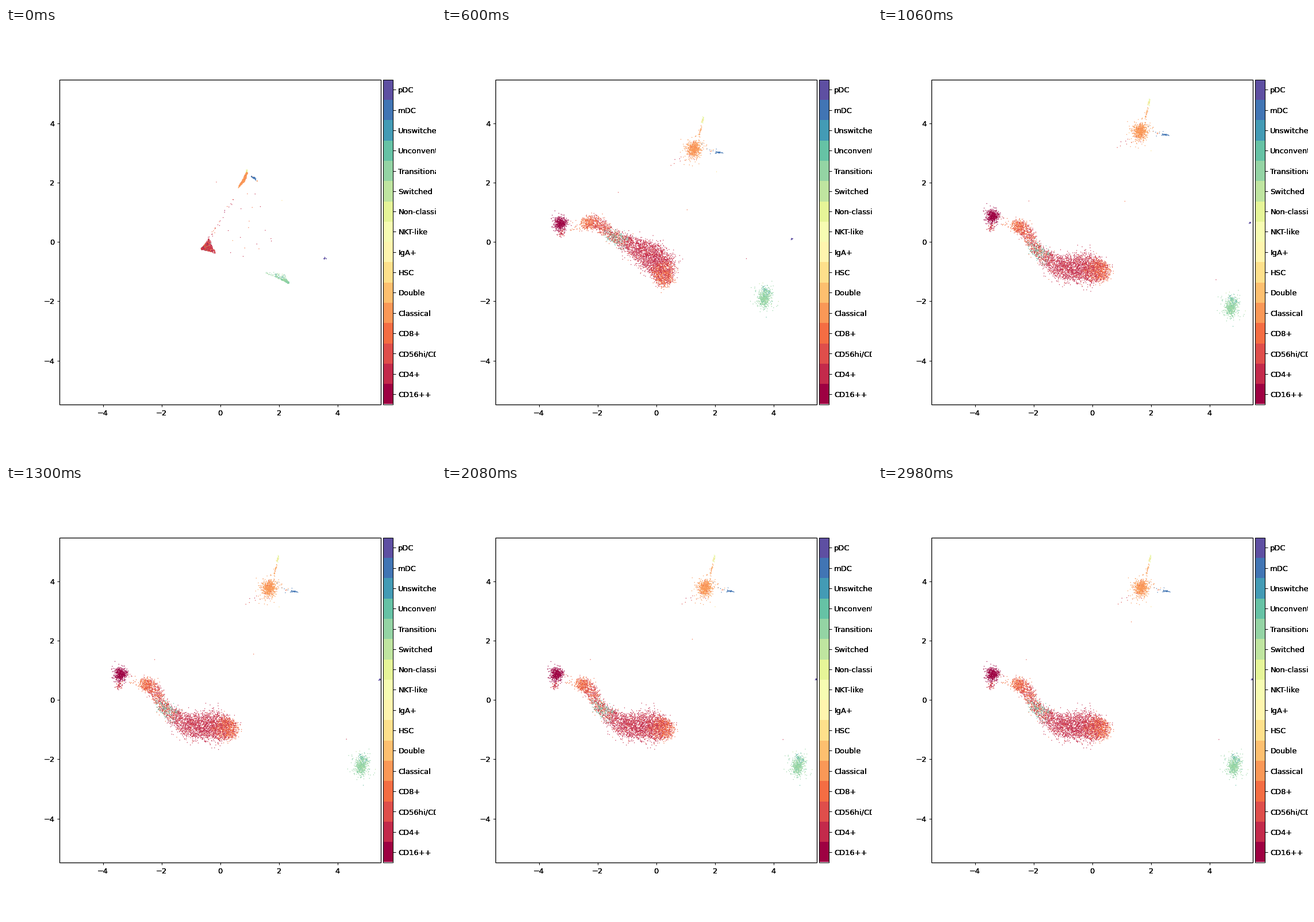
These frames come from a looping animation (748 px wide and 748 px high, 3030 ms). A matplotlib script:

```python
import numpy as np
import matplotlib.pyplot as plt
from matplotlib.animation import FuncAnimation
from matplotlib.patches import Rectangle

SIZE, DPI = 748, 93.5
LOOP, INTERVAL, STEP, STEPS = 3030, 15, 20, 150
LEFT, RIGHT = .125 * SIZE, 651.8
TOP, BOTTOM = .12 * SIZE, .875 * SIZE
BAR_X, BAR_W = 656.5, 16.75
TICK = 3.5 * DPI / 72
NAMES = ["CD16++", "CD4+", "CD56hi/CD16", "CD8+", "Classical", "Double",
         "HSC", "IgA+", "NKT-like", "Non-classical", "Switched",
         "Transitional", "Unconventional", "Unswitched", "mDC", "pDC"]
COLORS = plt.get_cmap("Spectral")(np.linspace(0, 1, len(NAMES)))

rng = np.random.default_rng(7)
groups = []  # (start, early home, late home, categories, mix function)


def wedge(n, corner, e1, e2, power):
    """Triangle of points crowded towards one corner."""
    r, f = rng.random((n, 1)) ** power, rng.random((n, 1))
    edge = f * np.array(e1) + (1 - f) * np.array(e2)
    return corner + r * edge + rng.normal(0, .5, (n, 2))


def drift(t):
    return 1 / (1 + np.exp((570 - t) / 145))


def island(n, cats, c0, c1, start, sx=0, sy=0, deg=0, off=(0, 0), mix=drift):
    """Rigid cloud that travels from c0 to c1."""
    z = rng.normal(size=(n, 2)) * np.where(rng.random((n, 1)) < .1, 1.8, 1)
    a = np.radians(deg)
    turn = np.array([[np.cos(a), np.sin(a)], [-np.sin(a), np.cos(a)]])
    shape = (z * [sx, sy]) @ turn + off
    groups.append((start, c0 + shape, c1 + shape, rng.choice(cats, n), mix))


# Lymphocytes: a cloud along a curve that bends from one pose to another.
# Knots: NK tail, NK, then the T cell body from left to right.
early = np.array([(247, 392), (230, 385), (259, 335), (279, 328),
                  (312, 351), (352, 374), (384, 405), (386, 441)])
late = np.array([(196, 347), (199, 327), (239, 344), (253, 348),
                 (275, 386), (316, 418), (362, 418), (393, 424)])
width = np.array([3, 5.5, 4.5, 6, 5, 10, 14, 7])
knots = np.arange(len(width))

body = np.interp(rng.random(4300), [0, .09, .21, .37, .68, 1], knots[2:])
u = np.concatenate([np.zeros(50), np.ones(480), rng.uniform(1, 2, 45), body])
n = len(u)
angle = rng.random(n) * 2 * np.pi
radius = np.where(u < 2, rng.rayleigh(1, n), 1.9 * np.sqrt(rng.random(n)))
radius *= np.where(rng.random(n) < .12, 1.5, 1)
cloud = np.column_stack([np.cos(angle), np.sin(angle)]) * radius[:, None]
cloud += rng.normal(0, .25, (n, 2))
cloud *= np.interp(u, knots, width)[:, None]


def along(points):
    return np.column_stack([np.interp(u, knots, points[:, i]) for i in (0, 1)]) + cloud


BANDS = [.5, 1.3, 2.8, 3.3, 3.7, 4.4, 6.4]
MIXES = [[0, 2, 2, 1], [0], [3, 3, 3, 4, 2], [3, 1, 2], [3, 3, 2, 1],
         [12, 12, 3, 2, 1], [1] * 14 + [2, 3], [3, 3, 3, 3, 1]]
kinds = np.array([rng.choice(MIXES[b]) for b in np.searchsorted(BANDS, u)])
lag = (.2 + 1.4 * np.clip((u - 1) / 6, 0, 1))[:, None]


def bend(t):
    p = np.clip((t - 340) / 720, 0, 1)
    return (p * p * (3 - 2 * p)) ** lag  # the left end leads


lymph = wedge(n, (341, 384), (12, -18), (24, 8), 8)
path = rng.choice(n, 42, replace=False)
lymph[path[:26]] = ((353, 367) + rng.random((26, 1)) ** 1.3 * [54, -90]
                    + rng.normal(0, 1.8, (26, 2)))
lymph[path[26:]] = rng.dirichlet([1, 1, 1], 16) @ [(350, 380), (430, 270), (485, 425)]
groups.append((lymph, along(early), along(late), kinds, bend))


# Myeloid cells share one path
def myeloid(n, cats, *shape, off=(0, 0), start=None):
    if start is None:
        start = wedge(n, (419, 252), (-16, 27), (-3, 14), 2)
    island(n, cats, (414, 252), (458, 177), start, *shape, off=off)


myeloid(640, [4] * 20 + [3, 5], 5.8, 7.2, 15)
myeloid(40, [4, 4, 5, 2], 11, 9, 20)
myeloid(28, [4, 4, 5], .6, 5.5, 14, off=(11, -32))
myeloid(32, [9, 9, 9, 6], .6, 3.8, 14, off=(14.5, -48),
        start=wedge(32, (419, 247), (1, 8), (-3, 6), 1))
myeloid(8, [2, 1, 3], 8, 2.5, -35, off=(-33, 24))
myeloid(36, [14], 3, .6, 7, off=(43, 6),
        start=wedge(36, (427, 258), (8, 7), (6, 2), 1))
myeloid(12, [14, 4, 14], 5, 2, 20, off=(29, 2),
        start=wedge(12, (427, 258), (14, 13), (8, 6), 1))


# B cells
def b_cells(n, cats, *shape, off=(0, 0)):
    island(n, cats, (489, 449), (619, 488), wedge(n, (491, 443), (-50, -21), (-4, -14), 5),
           *shape, off=off)


b_cells(430, [11] * 14 + [10, 12], 5, 6.5, 10)
b_cells(75, [11, 11, 13, 12], 4, 4, 0, off=(4, -14))
b_cells(50, [11, 11, 12, 10], 8, 9, 0, off=(1, -5))

island(16, [15], (557, 404), (651, 336), wedge(16, (553, 402), (5, 1), (2, -4), 1), .6, .5)

# Lone points
for cat, c0, c1, mix in [(3, (423, 336), (441, 235), lambda t: t / 3000),
                         (2, (366, 268), (258, 302), drift),
                         (1, (451, 352), (593, 441), drift),
                         (6, (480, 300), (475, 210), drift)]:
    island(1, [cat], c0, c1, np.array([c0]), mix=mix)

cats = np.concatenate([g[3] for g in groups])
N = len(cats)
order = rng.permutation(N)
fling = rng.normal(0, 45, (N, 2)) * rng.random((N, 1)) ** 3
fling[cats > 3] *= .3


def positions(step):
    t = step * STEP
    bunch = (1 - min(t / 340, 1)) ** 2.4
    pos = []
    for start, a, b, _, mix in groups:
        first = a + (b - a) * mix(0)
        pos.append(a + (b - a) * mix(t) + (start - first) * bunch)
    pos = np.concatenate(pos)
    if step:
        noise = np.random.default_rng(step).normal(size=(N, 2))
        pos += fling * (t / 80) * np.exp(1 - t / 80) + noise * .4 * (1 - step / STEPS)
    return pos[order]


fig = plt.figure(figsize=(SIZE / DPI, SIZE / DPI), dpi=DPI, facecolor="white")
ax = fig.add_axes([0, 0, 1, 1])
ax.set(xlim=(0, SIZE), ylim=(SIZE, 0))
ax.axis("off")


def tick(xs, ys):
    ax.plot(xs, ys, color="black", lw=.8, solid_capstyle="butt", zorder=4)


def label(x, y, s, ha, va="center_baseline"):
    # Overprinted for heavier edges
    for _ in range(3):
        ax.text(x, y, s, ha=ha, va=va, fontsize=10, family="DejaVu Sans")


def box(x, y, w, h, **style):
    return ax.add_patch(Rectangle((x, y), w, h, **style))


frame = dict(fill=False, ec="black", zorder=4)
area = box(LEFT, TOP, RIGHT - LEFT, BOTTOM - TOP, lw=1, **frame)

for v in range(-4, 5, 2):
    text = str(v).replace("-", "\u2212")
    x = (LEFT + RIGHT) / 2 + 51.03 * v
    y = (TOP + BOTTOM) / 2 - 51.64 * v
    tick([x, x], [BOTTOM, BOTTOM + TICK])
    tick([LEFT - TICK, LEFT], [y, y])
    label(x, BOTTOM + 2 * TICK, text, "center", "top")
    label(LEFT - 2 * TICK, y, text, "right")

cell = (BOTTOM - TOP) / len(NAMES)
bar_right = BAR_X + BAR_W
for i, name in enumerate(NAMES):
    y = BOTTOM - (i + .5) * cell
    box(BAR_X, y - cell / 2, BAR_W, cell, fc=COLORS[i], lw=0, antialiased=False)
    tick([bar_right, bar_right + TICK], [y, y])
    label(bar_right + 2 * TICK, y, name, "left")
box(BAR_X, TOP, BAR_W, BOTTOM - TOP, lw=.8, **frame)

dots = ax.scatter(*positions(0).T, s=1.1, c=COLORS[cats[order]],
                  linewidths=0, zorder=3)
dots.set_clip_path(area)


def update(i):
    dots.set_offsets(positions(min(i * INTERVAL // STEP, STEPS - 1)))
    return dots,


anim = FuncAnimation(fig, update, frames=LOOP // INTERVAL, interval=INTERVAL,
                     repeat=True, repeat_delay=0, blit=False)
plt.show()
```
